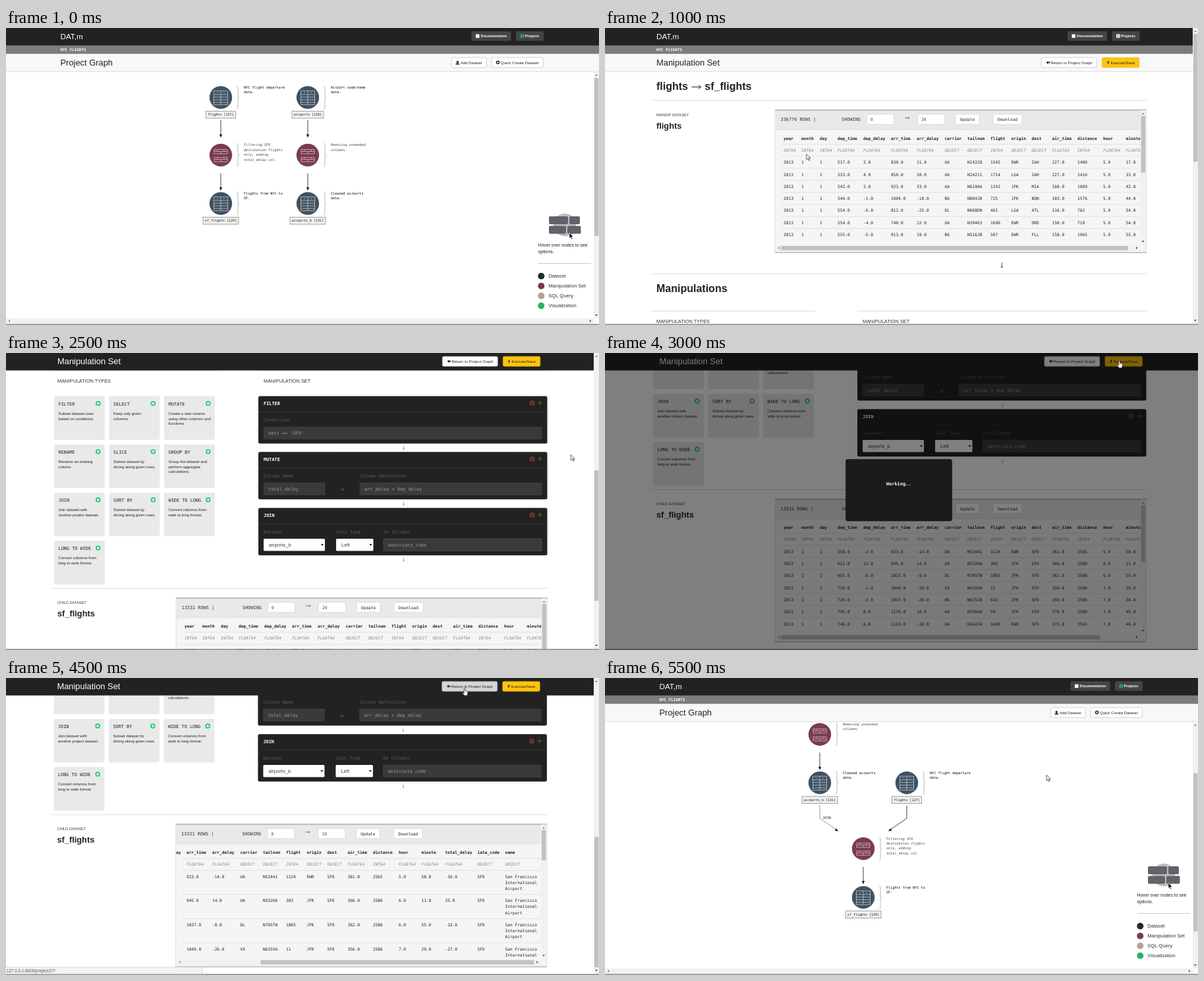
Animation, 900 px wide and 451 px high, one loop 8000 ms. Source, as an HTML page:

```html
<!DOCTYPE html>
<html lang="en">
<head>
<meta charset="utf-8">
<title>Project graph</title>
<style>
html, body { margin: 0; width: 100%; height: 100%; overflow: hidden; background: #fff; }
svg { display: block; }
text { font-family: "Liberation Sans", Arial, Helvetica, sans-serif; }
.m { font-family: "DejaVu Sans Mono", "Liberation Mono", monospace; }
.b { font-weight: bold; }
.i { font-style: italic; }
.c { text-anchor: middle; }
</style>
</head>
<body>
<svg id="stage" width="900" height="451" viewBox="0 0 900 451"></svg>
<script>
const stage = document.getElementById('stage');

// Drawing helpers
const T = (x, y, s, size, fill = '#222', cls = '') =>
  `<text x="${x}" y="${y}" font-size="${size}" fill="${fill}" class="${cls}">${s}</text>`;
const R = (x, y, w, h, fill, r = 0, stroke = 'none') =>
  `<rect x="${x}" y="${y}" width="${w}" height="${h}" rx="${r}" fill="${fill}" stroke="${stroke}" stroke-width=".6"/>`;
const C = (x, y, r, fill) => `<circle cx="${x}" cy="${y}" r="${r}" fill="${fill}"/>`;
const P = (d, stroke, w = .6, fill = 'none', extra = '') =>
  `<path d="${d}" stroke="${stroke}" stroke-width="${w}" fill="${fill}" ${extra}/>`;
const F = (d, fill) => P(d, 'none', 0, fill);
const move = (x, y, s) => `<g transform="translate(${x} ${y})">${s}</g>`;
const clip = (x, y, w, h, s) =>
  `<svg x="${x}" y="${y}" width="${w}" height="${h}" viewBox="${x} ${y} ${w} ${h}">${s}</svg>`;
const rule = (x1, x2, y, color = '#d2d2d2') => P(`M${x1} ${y}H${x2}`, color, .8);
const lines = (x, y, list, gap, draw) => list.map((s, i) => draw(x, y + i * gap, s)).join('');

const arrowCursor = (x, y, fill = '#fff') =>
  P(`M${x} ${y}v8.4l2-1.9 1.5 3.3 1.4-.6-1.5-3.2h2.6z`, fill === '#fff' ? '#000' : '#fff', .6, fill);
const handCursor = (x, y) =>
  P(`M${x - .8} ${y + .6}q.9-1.2 1.8 0v3.2l3 .8q1.2.4 1 2l-.7 3.2v1.4h-4.6l-2.9-4q0-1.4 1.3-.8l1.1 1z`, '#000', .6, '#fff');

const vbar = (x, y, h, ty, th) => R(x, y, 8, h, '#f1f1f1') + R(x + 1, ty, 6.5, th, '#c1c1c1')
  + F(`M${x + 2} ${y + 6}h4l-2-2.2z`, '#777') + F(`M${x + 2} ${y + h - 6}h4l-2 2.2z`, '#444');
const hbar = (x, y, w, tx, tw, color = '#c1c1c1') => R(x, y, w, 8, '#f1f1f1') + R(tx, y + 1, tw, 6.5, color)
  + F(`M${x + 6} ${y + 2}v4l-2.2-2z`, '#777') + F(`M${x + w - 6} ${y + 2}v4l2.2-2z`, '#444');

const bottomEdge = () => R(0, 449.4, 900, 1.6, '#8d8d8d');
const status = (s, w) => R(-1, 439, w, 10.4, '#f2f2f2', 0, '#c4c4c4') + T(1, 446.8, s, 6.35, '#555');

const plus = (x, y, r, fill, mark = '#fff') => C(x, y, r, fill)
  + P(`M${x - r * .55} ${y}h${r * 1.1}M${x} ${y - r * .55}v${r * 1.1}`, mark, r * .35);

// Site header: dark bar, project bar and light title bar
function siteHeader(x, title, iconColor) {
  return R(0, 0, 900, 27, '#222') + R(0, 26.5, 900, 13, '#7d7d7d') + R(0, 39.5, 900, 26.5, '#f8f8f8')
    + rule(0, 900, 66.2)
    + T(x, 17.4, 'DAT,m', 11.7, '#fff')
    + T(x, 35.2, 'NYC FLIGHTS', 5.9, '#fff', 'm b')
    + R(x + 624, 5, 60, 14.6, '#444', 2) + R(x + 630.5, 9.5, 5.5, 5.5, '#fff', .5) + T(x + 638, 14.2, 'Documentation', 5.45, '#fff', 'b')
    + R(x + 691.5, 5, 42, 14.6, '#444', 2) + R(x + 698, 9.5, 5.5, 5.5, iconColor, .5)
    + P(`M${x + 699} 11.5h3.5m-3.5 2h3.5`, '#444', .6) + T(x + 705, 14.2, 'Projects', 5.5, '#fff', 'b')
    + T(x, 57.2, title, 12.9);
}

const button = (x, y, w, fill, stroke) => R(x, y, w, 15, fill, 2, stroke);

// Project graph
const BLUE = '#405262', RED = '#7b3b4e';

function node(x, y, manip, text, label, fill = manip ? RED : BLUE) {
  const grid = manip
    ? 'M-10-8.5h20v6.5h-20zM-10 3.5h20v6.5h-20zM-10-5.5h20M-10 6.5h20M0-5.5v3.5M0 6.5v3.5M-6-7h2m8 0h2M-6 5h2m8 0h2'
    : 'M-10.5-10h21v21h-21zM-10.5-4.5h21m-21 4h21m-21 4h21m-21 4h21M0-10v21M-6-7.2h2m8 0h2';
  const w = label ? label.length * 3 + 6 : 0;
  return move(x, y, C(0, 0, 17.2, fill) + P(grid, '#e4e8ec', .6)
    + P('M24-17.5q2 0 2 3v11.5q0 3 2 3q-2 0-2 3v11.5q0 3-2 3', '#8a8a8a', .6)
    + lines(35, -13.7, text, 7.4, (a, b, s) => T(a, b, s, 5.15, manip ? '#444' : '#000', manip ? 'm i' : 'm'))
    + (label ? R(-w / 2, 20.7, w, 10.8, '#f1f1f1', 0, '#666') + T(0, 27.9, label, 5.03, '#111', 'm c') : ''));
}

const head = (x, y, turn = 0) => `<path transform="translate(${x} ${y}) rotate(${turn})" d="M0 0l-2.1-5h4.2z" fill="#111"/>`;
const down = (x, y) => P(`M${x} ${y}v23`, '#111', .8) + head(x, y + 26.5);

const FILTERING = ['Filtering SFO', 'destination flights', 'only, adding', 'total_delay col.'];
const DEPART = ['NYC flight departure', 'data.'], TO_SF = ['Flights from NYC to', 'SF.'];
const CODES = ['Airport code/name', 'data.'], REMOVING = ['Removing unneeded', 'columns.'];
const CLEANED = ['Cleaned airports', 'data.'];

const separateGraph = hover =>
  node(326, 105.5, 0, DEPART, 'flights [127]') + node(458, 105.5, 0, CODES, 'airports [128]')
  + node(326, 193, 1, FILTERING, '', hover ? '#90536a' : RED) + node(458, 193, 1, REMOVING)
  + node(326, 266.5, 0, TO_SF, 'sf_flights [129]') + node(458, 266.5, 0, CLEANED, 'airports_b [131]')
  + [326, 458].map(x => down(x, 140) + down(x, 220.5)).join('');

const joinedGraph = () =>
  node(326, 105.5, 0, CODES, 'airports [128]') + node(326, 193, 1, REMOVING)
  + node(326, 266.5, 0, CLEANED, 'airports_b [131]') + node(458, 266.5, 0, DEPART, 'flights [127]')
  + node(392, 366.5, 1, FILTERING) + node(392, 440.5, 0, TO_SF, 'sf_flights [129]')
  + down(326, 140) + down(326, 220.5) + down(392, 394)
  + P('M326 301v19.5l25 17', '#111', .7, 'none', 'stroke-dasharray="1.8 1.2"') + head(354, 340, -57)
  + P('M458 301v19.5l-25 17', '#111', .8) + head(430, 340, 57)
  + T(330.5, 321.7, 'JOIN', 5.15, '#111', 'm');

function sidebar() {
  const bricks = [[824, 286, 29], [855, 286, 16], [824, 300.5, 26], [852, 300.5, 20.5]];
  const legend = [['Dataset', '#1f2a35'], ['Manipulation Set', RED], ['SQL Query', '#b3a48f'], ['Visualization', '#2bb06a']];
  return C(848, 299, 17.2, '#bdbdbd') + bricks.map(([x, y, w]) => R(x, y, w, 12, '#636169', 2)).join('')
    + arrowCursor(855, 311, '#000')
    + T(807.5, 332.3, 'Hover over nodes to see', 6.9) + T(807.5, 341.5, 'options.', 6.9)
    + rule(807.5, 888, 357.5, '#bbb')
    + legend.map(([s, color], i) => C(812.3, 376.7 + i * 15, 5, color) + T(823.3, 379 + i * 15, s, 7.6, '#333')).join('');
}

const graphPage = (graph, scroll, extra) =>
  clip(0, 66, 892, 375, move(0, -scroll, graph))
  + siteHeader(82.5, 'Project Graph', '#27ae60')
  + button(676, 45, 53.5, '#fff', '#bbb') + F('M685.3 49.5l2.6 2.8h-1.6v1.6h-2v-1.6h-1.6zM682.5 54h5.6v1.4h-5.6z', '#222')
  + T(690, 54.8, 'Add Dataset', 5.9)
  + button(737, 45, 78.5, '#fff', '#bbb') + plus(746.5, 52.3, 2.7, '#222') + T(751, 54.8, 'Quick Create Dataset', 6)
  + sidebar() + vbar(892, 66.5, 374.5, 76 + scroll * .64, 240) + hbar(0, 441, 892, 0, 0)
  + extra + bottomEdge();

// Data tables: name, x, type
const COLUMNS = `year 271 INT64,month 298 INT64,day 326 INT64,dep_time 353 FLOAT64,dep_delay 392 FLOAT64,
arr_time 434 FLOAT64,arr_delay 473 FLOAT64,carrier 515.5 OBJECT,tailnum 550 OBJECT,flight 585 INT64,
origin 616.5 OBJECT,dest 647.5 OBJECT,air_time 678.5 FLOAT64,distance 717 INT64,hour 756 FLOAT64,
minute 790.5 FLOAT64,total_delay 826.5 FLOAT64,iata_code 875.5 OBJECT,name 917.7 OBJECT`
  .split(',').map(c => c.trim().split(' '));

const PARENT = `517.0 2.0 830.0 11.0 UA N14228 1545 EWR IAH 227.0 1400 5.0 17.0
533.0 4.0 850.0 20.0 UA N24211 1714 LGA IAH 227.0 1416 5.0 33.0
542.0 2.0 923.0 33.0 AA N619AA 1141 JFK MIA 160.0 1089 5.0 42.0
544.0 -1.0 1004.0 -18.0 B6 N804JB 725 JFK BQN 183.0 1576 5.0 44.0
554.0 -6.0 812.0 -25.0 DL N668DN 461 LGA ATL 116.0 762 5.0 54.0
554.0 -4.0 740.0 12.0 UA N39463 1696 EWR ORD 150.0 719 5.0 54.0
555.0 -5.0 913.0 19.0 B6 N516JB 507 EWR FLL 158.0 1065 5.0 55.0`.split('\n');

const CHILD = `558.0 -2.0 923.0 -14.0 UA N53441 1124 EWR SFO 361.0 2565 5.0 58.0
611.0 11.0 945.0 14.0 UA N532UA 303 JFK SFO 366.0 2586 6.0 11.0
655.0 -5.0 1037.0 -8.0 DL N705TW 1865 JFK SFO 362.0 2586 6.0 55.0
729.0 -1.0 1049.0 -26.0 VX N635VA 11 JFK SFO 356.0 2586 7.0 29.0
734.0 -3.0 1047.0 -26.0 B6 N625JB 643 JFK SFO 350.0 2586 7.0 34.0
745.0 0.0 1135.0 10.0 AA N336AA 59 JFK SFO 378.0 2586 7.0 45.0
746.0 0.0 1119.0 -10.0 UA N24224 1668 EWR SFO 373.0 2565 7.0 46.0`.split('\n');

const AIRPORT = ['San Francisco', 'International', 'Airport'];

function table(count, rows, o) {
  const gap = o.joined ? 36.6 : 18.3, dx = o.dx || 0;
  const cell = (x, y, s, fill = '#222', cls = '') => T(x, y, s, 6.2, fill, 'm ' + cls);
  let grid = '';
  for (const [name, x, type] of COLUMNS) grid += cell(x, 169.6, name, '#222', 'b') + cell(x, 187.7, type, '#888', 'i');
  grid = move(-dx, 0, grid) + rule(267, 812, 176.5, '#dcdcdc');
  rows.forEach((row, i) => {
    const y = 206.2 + i * gap, v = ['2013', '1', '1', ...row.split(' ')];
    if (o.joined) v.push((+v[4] + +v[6]).toFixed(1), 'SFO');
    grid += rule(267, 812, y - 11.5, '#dcdcdc')
      + move(-dx, 0, v.map((s, k) => cell(COLUMNS[k][1], y, s)).join('')
        + (o.joined ? lines(917.7, y, AIRPORT, 9.1, (a, b, s) => cell(a, b, s)) : ''));
  });
  return R(258, 124, 563.5, 217.5, '#f5f5f5', 1, '#ccc') + R(258, 124, 563.5, 30.3, '#e9e9e9')
    + R(258, 123.7, 563.5, 2, '#bdbdbd') + R(258, 340, 563.5, 1.8, '#c8c8c8') + rule(258, 812, 154.3, '#dadada')
    + T(266.5, 141.2, count + ' ROWS |', 6.86, '#333', 'm') + T(359, 141.2, 'SHOWING', 6.86, '#333', 'm')
    + R(397.5, 131, 41, 15.3, '#fff', 1, '#ccc') + T(403, 141, '0', 6.2, '#444', 'm')
    + P('M455 136.5h7m-1.8-1.6l1.8 1.6-1.8 1.6', '#333', .6)
    + R(474.5, 131, 41, 15.3, '#fff', 1, '#ccc') + T(480, 141, '20', 6.2, '#444', 'm')
    + R(532, 131, 36, 15.3, '#fff', 1.5, '#ccc') + T(550, 141, 'Update', 6.2, '#222', 'm c')
    + R(589, 131, 44, 15.3, '#fff', 1.5, '#ccc') + T(611, 141, 'Download', 6.2, '#222', 'm c')
    + clip(258.5, 155, 554, 174, grid)
    + vbar(812.6, 125, 204, 133.5, o.vThumb || 86)
    + hbar(259, 330, 553, o.joined ? 267 + dx * .752 : 267, o.hThumb, o.drag ? '#787878' : undefined);
}

// Manipulation page
const CARDS = [
  ['FILTER', 'Subset dataset rows', 'based on conditions.'], ['SELECT', 'Keep only given', 'columns.'],
  ['MUTATE', 'Create a new column', 'using other columns and', 'functions.'],
  ['RENAME', 'Rename an existing', 'column.'], ['SLICE', 'Subset dataset by', 'slicing along given rows.'],
  ['GROUP BY', 'Group the dataset and', 'perform aggregate', 'calculations.'],
  ['JOIN', 'Join dataset with', 'another project dataset.'], ['SORT BY', 'Subset dataset by', 'slicing along given rows.'],
  ['WIDE TO LONG', 'Convert columns from', 'wide to long format.'],
  ['LONG TO WIDE', 'Convert columns from', 'long to wide format.']];

function card([title, ...text], i) {
  return move(73 + i % 3 * 83.5, 468.5 + Math.floor(i / 3) * 73.2,
    R(0, 0, 77, 66.3, '#e9e9e9', 2.5) + T(6.5, 14, title, 6.86, '#222', 'm') + plus(66.8, 11, 3.8, '#2ecc71')
    + lines(6.5, 28.4, text, 7.7, (x, y, s) => T(x, y, s, 5.9)));
}

const field = (x, w, label, value, glow) => T(x, 38.3, label, 6.9, '#5c5c5c', 'm')
  + R(x, 46.7, w, 18.6, '#3a3a3a', 1, glow ? '#43606f' : '#444') + T(x + 7, 58.4, value, 6.9, '#9a9a9a', 'm');
const select = (x, w, label, value) => T(x, 38.3, label, 6.9, '#5c5c5c', 'm')
  + R(x, 46.7, w, 18.6, '#fff', 1.5) + T(x + 8, 58.6, value, 7.6, '#444') + F(`M${x + w - 6} 54.8h4l-2 3z`, '#222');

const panel = (y, title, body) => move(0, y, R(383, 0, 438.5, 72, '#222', 2.5) + rule(383, 821.5, 24, '#383838')
  + T(391, 13.6, title, 6.9, '#fff', 'm b')
  + `<circle cx="798.7" cy="10.6" r="3.3" fill="none" stroke="#d9402f" stroke-width="1"/>`
  + P('M797.3 9.2l2.8 2.8m0-2.8l-2.8 2.8', '#d9402f', .9) + P('M807.2 10.4h6.6M810.5 7.1v6.6', '#555', 1.2)
  + body + P('M603.5 76v5m-1.2-1.4l1.2 1.4 1.2-1.4', '#666', .6));

function actions(x, y, hover) {
  return button(x, y, 84, hover ? '#d6d6d6' : '#fff', hover ? '#9fb6cc' : '#bbb')
    + F(`M${x + 7.3} ${y + 7.4}l2.8-2.5v1.7h3v1.6h-3v1.7z`, '#222') + T(x + 14.2, y + 9.8, 'Return to Project Graph', 5.97)
    + button(x + 92, y, 56.5, '#fdc50f', '#e5b000') + F(`M${x + 101.8} ${y + 4.5}l-2.4 3.6h1.6l-.8 2.9 2.9-4h-1.7l1.2-2.5z`, '#222')
    + T(x + 105.3, y + 9.8, 'Execute/Save', 5.9);
}

function editPage(o) {
  const scroll = o.scroll || 0, sx = o.sx || 0, hx = o.hx || 0;
  const label = (x, y, s, size) => T(x, y, s, size, '#333');
  const body =
    T(78, 94.2, 'flights', 16, '#222', 'b') + P('M131.5 89.6h14m-3.6-3l3.6 3-3.6 3', '#222', 1) + T(151.3, 94.2, 'sf_flights', 16, '#222', 'b')
    + rule(70, 822, 109.8)
    + label(78, 134, 'PARENT DATASET', 5.65) + T(78, 153, 'flights', 12.8, '#222', 'b')
    + table(336776, PARENT, { hThumb: 527 })
    + P('M602.3 356v8m-1.7-2.2l1.7 2.2 1.7-2.2', '#333', .8)
    + rule(70, 822, 373.3) + T(78, 400.6, 'Manipulations', 16, '#222', 'b')
    + rule(70, 320, 430) + rule(383, 822, 430)
    + label(78, 448.4, 'MANIPULATION TYPES', 7.4) + label(391, 448.4, 'MANIPULATION SET', 7.4)
    + CARDS.map(card).join('')
    + panel(468.5, 'FILTER', field(391, 422, 'Conditions', "dest == 'SFO'"))
    + panel(553.3, 'MUTATE', field(391, 93, 'Column Name', 'total_delay') + T(508, 60, '=', 9, '#666', 'm')
      + field(537, 276, 'Column Definition', 'arr_delay + dep_delay'))
    + panel(638.3, 'JOIN', select(391, 93, 'Dataset', o.dataset || 'airports_b') + select(501, 56.5, 'Join Type', 'Left')
      + field(573, 240, 'On Columns', o.dataset ? '' : 'dest=iata_code', o.glow))
    + (o.menu ? R(391, 703.6, 93, 20, '#fff', 0, '#888') + R(391.3, 713.4, 92.4, 10, '#1e90ff')
      + T(394, 711.3, 'airports', 7.4) + T(394, 721, 'airports_b', 7.4, '#fff') : '')
    + rule(70, 822, 760.6)
    + label(78, 784.4, 'CHILD DATASET', 5.65) + T(78, 803.2, 'sf_flights', 12.8, '#222', 'b')
    + move(0, 650.5, table(13331, o.joined ? CHILD.slice(0, 4) : CHILD,
      { joined: o.joined, dx: o.dx, drag: o.drag, hThumb: o.joined ? 415 : 484, vThumb: o.joined ? 46 : 86 }));
  const header = scroll
    ? R(0, 0, 900, 26.5, '#222') + T(78 + hx, 17.4, 'Manipulation Set', 12.9, '#fff') + actions(662.3 + hx, 5.2, o.hover)
    : siteHeader(78, 'Manipulation Set', '#fff') + actions(662.3, 45, false);
  return move(sx, 0, move(0, -scroll, body)) + header
    + (o.working ? '' : vbar(892, 0, 449, 9 + scroll * .42, scroll ? 198 : 194))
    + bottomEdge()
    + (o.working ? R(0, 0, 900, 451, 'rgba(0,0,0,.5)') + R(365.5, 161.5, 161, 93.5, '#1b1b1b', 3, '#0c0c0c')
      + T(427, 200.8, 'Working..', 6.9, '#fff', 'm b') : '')
    + (o.toast ? R(663.5, 343.5, 214.5, 93.5, '#388e3c', 2.5) + T(676, 363.4, 'Transformation successful.', 6.9, '#fff', 'm b') : '')
    + (o.extra || '');
}

const LINK = '127.0.0.1:8000/project/27/';
const done = { scroll: 553, sx: -.6, hx: -.6, joined: true };
const scenes = [
  () => graphPage(separateGraph(), 0, ''),
  () => graphPage(separateGraph(true), 0, handCursor(327, 192) + status(LINK + 'manipulation/129/', 299)),
  () => editPage({ dataset: 'airports', extra: arrowCursor(305.8, 191.5) }),
  () => editPage({ scroll: 403, dataset: 'airports', extra: handCursor(140, 218) }),
  () => editPage({ scroll: 403, dataset: 'airports', menu: true, extra: arrowCursor(436, 310) }),
  () => editPage({ scroll: 403, glow: true, extra: arrowCursor(857.3, 154.5) }),
  () => editPage({ scroll: 553, hx: 4.6, working: true, extra: handCursor(780.5, 11.5) }),
  () => editPage({ ...done, toast: true, extra: handCursor(780.5, 11.5) }),
  () => editPage({ ...done, dx: 159.5, drag: true, extra: arrowCursor(690, 428) }),
  () => editPage({ ...done, dx: 159.5, hover: true, extra: handCursor(696, 15.5) + status(LINK, 299) }),
  () => graphPage(joinedGraph(), 0, arrowCursor(696, 15)),
  () => graphPage(joinedGraph(), 107.3, arrowCursor(670.2, 147.3))
];

const LOOP = 8000, STEP = 500;
const start = performance.now();
let shown = -1;
function tick() {
  const t = (performance.now() - start) % LOOP;
  const i = Math.min(scenes.length - 1, Math.floor(t / STEP));
  if (i !== shown) stage.innerHTML = scenes[shown = i]();
  requestAnimationFrame(tick);
}
tick();
</script>
</body>
</html>
```
